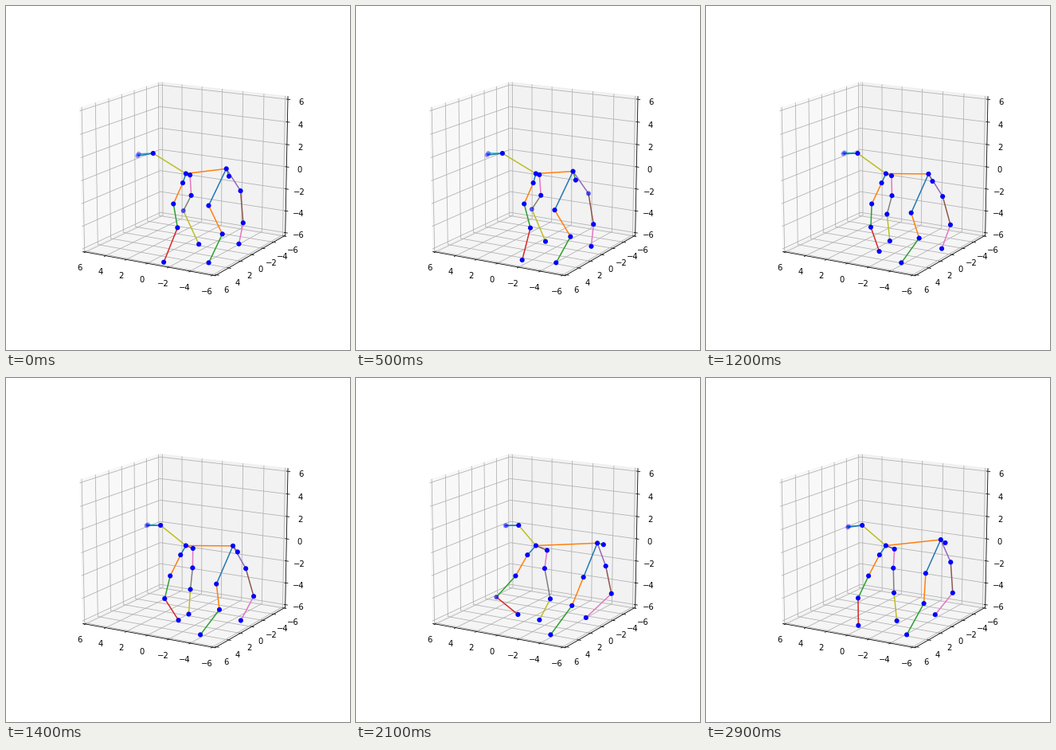
Write a matplotlib script that moves like this. It is 432 by 432 pixels and loops after 3000 ms.

```python
import numpy as np
import matplotlib.pyplot as plt
from matplotlib.animation import FuncAnimation
from matplotlib.patches import Polygon

SIZE, FRAMES, INTERVAL = 432, 30, 100
ELEV, AZIM, DIST = np.radians(15), np.radians(120), 10
CENTRE, SCALE = (225.92, 210.51), (1809.7, 1763.0)
EDGE, LABEL_EDGE = 6.25, 7.085
TICKS = range(-6, 7, 2)


def joint(rest, stride=(0, 0), sway=(0, 0)):
    """A resting place and how far the two shared motions carry it."""
    return np.array([rest, stride, sway], float)


TRUNK = {
    "withers": joint((225.9, 210.5)),
    "rump": joint((272.7, 207.3), (31.6, -1), (-2, 4)),
    "tail": joint((276, 218.2), (36, -10.5), (-1.5, 5)),
    "neck": joint((183.8, 185), (20.7, 0), (1, 0)),
    "nose": joint((166, 185), (22.9, 0.7), (1.8, -1)),
    "jaw": joint((164.5, 187.3), (23.3, -1.6), (1.5, -1.3)),
}
FORE_A = {
    "shoulder a": joint((222.6, 222.2), (-7.4, 0)),
    "elbow a": joint((211.2, 248.5), (-11, 0)),
    "wrist a": joint((219, 278.7), (-43.6, -3.6)),
    "paw a": joint((207.6, 319.5), (-7.6, -21.5), (12.5, -5.6)),
}
FORE_B = {
    "shoulder b": joint((230.3, 211.9), (9.9, 4.6)),
    "elbow b": joint((232.2, 237.8), (4.8, 1.4)),
    "wrist b": joint((220.8, 255.2), (23.7, 22.7)),
    "paw b": joint((238.5, 296), (-6.7, 8.9), (-6, -3.5)),
}
HIND_A = {
    "knee a": joint((249.7, 255.7), (37.4, -7.3), (-2.4, 6.3)),
    "hock a": joint((269.6, 289.3), (2.4, -4.5), (-2.7, 3.6)),
    "foot a": joint((251.7, 322.4), (-6.2, 0), (-4.8, 0)),
}
HIND_B = {
    "knee b": joint((292, 235.1), (22.4, 0), (-1, 4.2)),
    "hock b": joint((298, 274), (22.5, -3.8), (2.9, 1.9)),
    "foot b": joint((295.2, 301.5), (-7.3, -1.5), (3, 3.7)),
}
JOINTS = {**TRUNK, **FORE_A, **FORE_B, **HIND_A, **HIND_B}


def chain(root, limb, colour):
    nodes = [root, *limb]
    return [(a, b, f"C{colour + i}")
            for i, (a, b) in enumerate(zip(nodes, nodes[1:]))]


BONES = [
    *chain("withers", FORE_A, 0),
    *chain("withers", FORE_B, 5),
    ("withers", "neck", "C8"), ("neck", "nose", "C9"), ("neck", "jaw", "C0"),
    ("withers", "rump", "C1"), ("rump", "tail", "C2"),
    *chain("rump", HIND_A, 0),
    *chain("rump", HIND_B, 4),
]

# Frames in which a joint lies behind both of its neighbours
BEHIND = {"wrist a": range(16, 27), "wrist b": range(0, 8),
          "knee b": range(3, 12)}


def project(x, y, z):
    """Perspective view of the 12-unit cube, in stage pixels."""
    x, y, z = x / 12, y / 12, z / 12
    flat = np.cos(AZIM) * x + np.sin(AZIM) * y
    right = np.cos(AZIM) * y - np.sin(AZIM) * x
    up = np.cos(ELEV) * z - np.sin(ELEV) * flat
    depth = DIST - np.cos(ELEV) * flat - np.sin(ELEV) * z
    return (CENTRE[0] + SCALE[0] * right / depth,
            CENTRE[1] - SCALE[1] * up / depth)


def path(points, colour, width=0.8):
    ax.plot(*zip(*(project(*p) for p in points)), color=colour, lw=width)


def pane(points, grey):
    ax.add_patch(Polygon([project(*p) for p in points], closed=True,
                         fc=(grey,) * 3, ec=(grey,) * 3, alpha=0.5, lw=1))


def draw_box():
    e, g = EDGE, "#b0b0b0"
    pane([(e, -e, -e), (e, e, -e), (e, e, e), (e, -e, e)], 0.95)
    pane([(-e, -e, -e), (e, -e, -e), (e, -e, e), (-e, -e, e)], 0.90)
    pane([(-e, -e, -e), (e, -e, -e), (e, e, -e), (-e, e, -e)], 0.925)

    o, i, f = e + 0.2, e - 0.1, LABEL_EDGE
    # Per axis: edge line, grid path, tick mark and label place at value v
    axes = [
        ([(-e, e, -e), (e, e, -e)],
         lambda v: [(v, e, -e), (v, -e, -e), (v, -e, e)],
         lambda v: [(v, o, -e), (v, i, -e)],
         lambda v: (v, f, -f)),
        ([(-e, e, -e), (-e, -e, -e)],
         lambda v: [(-e, v, -e), (e, v, -e), (e, v, e)],
         lambda v: [(-o, v, -e), (-i, v, -e)],
         lambda v: (-f, v, -f)),
        ([(-e, -e, -e), (-e, -e, e)],
         lambda v: [(-e, -e, v), (e, -e, v), (e, e, v)],
         lambda v: [(-o, -e, v), (-i, -e, v)],
         lambda v: (-f, -f, v)),
    ]
    for edge, grid, tick, label in axes:
        path(edge, "black")
        for v in TICKS:
            path(grid(v), g)
        for v in TICKS:
            path(tick(v), "black")
            ax.text(*project(*label(v)), str(v).replace("-", "\u2212"),
                    size=10, ha="center", va="top")


def pose(frame):
    """Every joint follows one stride pulse and one sway, a quarter apart."""
    stride = ((1 + np.cos(np.radians(10 * (frame - 22.5)))) / 2) ** 1.3
    sway = np.cos(np.radians(10 * (frame - 13.5)))
    return {name: np.array([1, stride, sway]) @ moves
            for name, moves in JOINTS.items()}


def alphas(name, frame):
    """Opacity of the two stacked dots of a joint."""
    if name in ("nose", "jaw"):
        return 0.3, 0
    return (0.3, 0.3) if frame in BEHIND.get(name, ()) else (1, 0.3)


plt.rcParams["font.family"] = "DejaVu Sans"
fig = plt.figure(figsize=(6, 6), dpi=72, facecolor="white")
ax = fig.add_axes([0, 0, 1, 1])
ax.set(xlim=(0, SIZE), ylim=(SIZE, 0), autoscale_on=False)
ax.axis("off")
draw_box()

lines = [ax.plot([], [], color=c, lw=1.5)[0] for _, _, c in BONES]
start = np.zeros(2 * len(JOINTS))
dots = ax.scatter(start, start, s=20, c="blue", linewidths=1.5,
                  edgecolors="face", zorder=4)


def update(frame):
    place = pose(frame)
    for line, (a, b, _) in zip(lines, BONES):
        line.set_data(*zip(place[a], place[b]))
    dots.set_offsets(np.repeat(list(place.values()), 2, axis=0))
    dots.set_facecolor([(0, 0, 1, a) for n in JOINTS for a in alphas(n, frame)])
    return [*lines, dots]


anim = FuncAnimation(fig, update, frames=FRAMES, interval=INTERVAL,
                     repeat=True, repeat_delay=0, blit=False)
plt.show()
```
